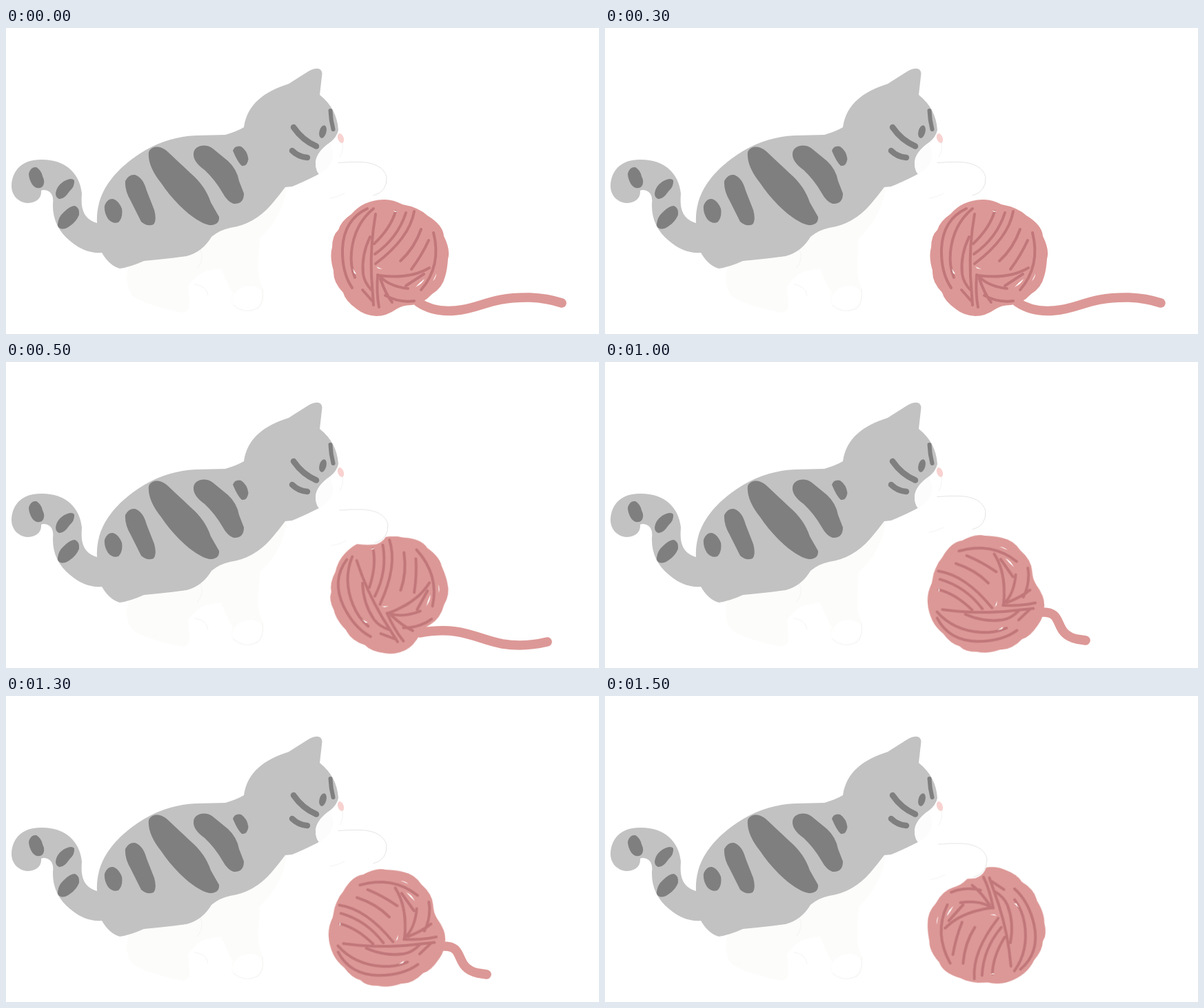
Write an HTML page that moves like this. It is 860 px wide and 444 px high and loops after 2000 ms.

```html
<!DOCTYPE html>
<html lang="en">
<head>
<meta charset="utf-8">
<title>Kitten and yarn</title>
<style>
  html, body { margin: 0; width: 100%; height: 100%; overflow: hidden; background: #fff; }
  svg { display: block; width: 860px; height: 444px; }
  path { stroke-linecap: round; stroke-linejoin: round; }
  .fur { fill: #c2c2c2; }
  .dark { fill: #7f7f7f; }
  .mark { fill: none; stroke: #7f7f7f; }
  .pale { fill: #fcfcfa; }
  .faint { fill: none; stroke: #f4f4f4; }
  .yarn { fill: #dc9896; }
  .strand { fill: none; stroke: #c17779; stroke-width: 4; }
  .tail { fill: none; stroke: #dc9896; stroke-width: 13.5; }
  .gap { fill: #fff; }
</style>
</head>
<body>
<svg viewBox="0 0 860 444">
  <!-- legs -->
  <path class="pale" d="M178 345Q170 375 185 390L203 399Q230 408 255 413Q267 412 266 400L264 375Q275 358 292 352L312 349Q320 370 329 385Q323 402 335 408Q350 414 368 405Q376 395 372 376Q364 362 366 335L368 305Q400 276 407 233L385 240L290 290L200 330Z"/>
  <path class="gap" d="M328 392C335 372 361 370 370 381C376 397 364 409 347 410C333 409 327 402 328 392Z"/>
  <path class="faint" d="M330 402Q345 416 365 407Q375 398 372 379M274 372Q291 374 293 388M282 322Q288 335 278 348"/>

  <!-- body -->
  <path class="fur" d="M410 81Q424 72 440 62Q457 54 458.500 66L455 97Q480 117 482 148Q480 158 470 166Q450 180 449 195Q449 207 454 212Q430 224 415 230L405 231Q396 243 385 256Q360 285 325 290Q310 293 298 303Q285 325 262 331Q235 335 200 338Q180 347 165 349Q150 345 139 326Q115 328 93 309Q67 288 68 255Q70 240 60 236Q54 234 51 236C52 248 42 254 31 254C18 253 8 243 8 229C9 205 25 191 50 191C85 190 107 210 110 240C109 255 108 276 132 283C130 245 150 215 183 190Q225 158 275 156L318 155Q335 150 345 144C350 110 375 92 410 81Z"/>
  <g class="dark">
    <path d="M207 180C211 170 225 170 235 180L268 211Q289 229 297 253L309 274Q310 286 295 286C275 282 245 255 225 225Q205 200 207 180Z"/>
    <path d="M272 182C273 170 290 167 300 175L322 193Q335 205 338 222L345 240Q345 256 330 255Q321 252 314 239Q303 220 288 206Q271 194 272 182Z"/>
    <path d="M329 178Q332 170 341 172Q350 178 351.500 190Q350 201 342 200Q336 195 329 178Z"/>
    <path d="M173 222Q178 212 187 213Q199 217 204 236L215 264Q219 279 214 285Q205 289 196 281L181 251Q172 236 173 222Z"/>
    <path d="M143 258Q147 247 155 248Q163 250 168 262Q170 275 163 282Q155 285 148 277Q142 268 143 258Z"/>
    <path d="M33 211Q36 201 44 202Q51 206 53 215Q58 225 52 231Q44 235 38 227Q33 219 33 211Z"/>
    <path d="M72 240Q73 230 83 223Q95 216 99 221Q100 230 92 237Q84 249 77 248Q72 246 72 240Z"/>
    <path d="M75 284Q76 274 84 267Q93 258 100 258Q107 261 106 271Q102 281 93 287Q85 293 79 291Q74 289 75 284Z"/>
    <ellipse cx="459.500" cy="150.500" rx="5" ry="9.500" transform="rotate(15 459.500 150.500)"/>
  </g>
  <path class="mark" stroke-width="8.500" d="M417 144Q430 163 450 171.500M415 178Q424 187 437 188"/>
  <path class="mark" stroke-width="6" d="M470.500 120Q471 133 474.500 147"/>
  <path fill="#fcfcfc" d="M470 166Q450 180 449 195Q449 207 454 212Q476 200 474 180Z"/>
  <path class="faint" d="M488 166Q490 178 484 187"/>
  <ellipse cx="485.500" cy="160" rx="4.200" ry="7.200" fill="#f8d2d0" transform="rotate(-20 485.500 160)"/>

  <!-- yarn -->
  <path class="tail" d="M598 398Q620 413 652 410C690 407 700 390 760 391Q785 392 806 399"/>
  <path class="tail" d="M600 393C660 382 682 402 720 409Q752 414 785 406"/>
  <path class="tail" d="M633 363C668 361 648 394 684 402L697 404"/>
  <g id="ball">
    <path class="yarn" d="M547 249Q560 248 575 256Q598 260 611 272Q634 286 635 302Q645 322 641 335Q640 350 637 360Q633 377 618 386Q604 401 588 402Q575 402 566 408Q552 418 537 418Q520 417 509 408Q492 396 489 384Q474 369 475 352Q469 332 473 318Q473 301 482 293Q486 280 501 270Q518 250 547 249Z"/>
    <path class="strand" d="M524 262Q490 278 488 320Q487 355 502 377M533 262Q505 285 501 325Q499 345 506 362M528 303Q515 330 518 357Q520 370 530 380M536 270Q528 315 530 360L533 402M517 380L532 397M565 266Q558 290 534 313M580 268Q568 305 535 328M592 266Q585 305 536 342"/>
    <path class="strand" d="M602 292Q592 320 572 338M613 308Q603 330 588 350M620 297Q632 345 602 380M541 359Q585 365 614 348M541 359Q555 375 583 378M539 358Q537 385 541 405M543 364Q550 385 560 398M550 388Q570 399 592 396M580 374L606 357"/>
    <path class="gap" d="M594 376Q599 370 607 364Q604 371 594 376ZM619 367Q623 360 624 356Q624 363 619 367ZM503 349L508 357L505 356ZM537 346L546 350L540 349ZM562 265L568 266L564 267Z"/>
  </g>

  <!-- reaching paw -->
  <g id="paw">
    <path class="gap" d="M440 222Q470 196 515 194.500Q546 196 552 216Q554 238 535 245Q515 247 500 243L466 250Z"/>
    <path fill="none" stroke="#e4e4e4" d="M482 195.500Q500 194 515 194.500Q546 196 552 216Q553 238 533 243"/>
    <path class="faint" d="M470 247Q480 246 491 240"/>
  </g>
</svg>
<script>
  const steps = [
    { x: 556.5, y: 333.5, turn: 0, paw: [0, 0] },
    { x: 556.5, y: 334.5, turn: -28, paw: [2, 19.5] },
    { x: 552, y: 336.5, turn: -92, paw: [0, 0] },
    { x: 552.5, y: 336, turn: -195, paw: [2, 19.5] }
  ];

  // Each value holds for a quarter of the loop.
  function play(el, prop, value) {
    const frames = steps.map((s, i) => ({
      [prop]: value(s, i), offset: i / steps.length, easing: "step-end"
    }));
    frames.push({ [prop]: value(steps[0], 0), offset: 1 });
    el.animate(frames, { duration: 2000, iterations: Infinity }).startTime = 0;
  }

  play(document.getElementById("ball"), "transform", s =>
    `translate(${s.x}px, ${s.y}px) rotate(${s.turn}deg) translate(-556.5px, -333.5px)`);
  play(document.getElementById("paw"), "transform", s =>
    `translate(${s.paw[0]}px, ${s.paw[1]}px)`);
  document.querySelectorAll(".tail").forEach((el, n) =>
    play(el, "opacity", (s, i) => i === n ? 1 : 0));
</script>
</body>
</html>
```
